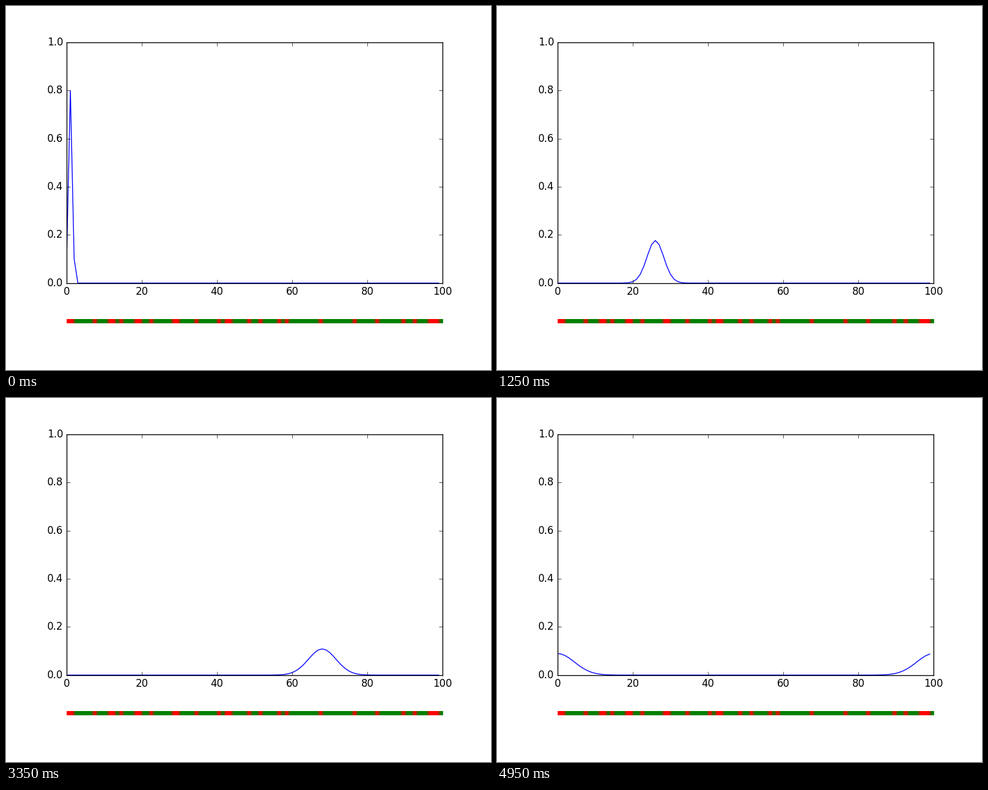
Animation, 800 px wide and 600 px high, one loop 5 s. Source, as a matplotlib script:

```python
import matplotlib.pyplot as plt
import numpy as np
from matplotlib.animation import FuncAnimation

CELLS = 100
STEPS = 100
W, H, DPI = 800, 600, 100
KERNEL = {0: 0.1, 1: 0.8, 2: 0.1}  # chance of moving this many cells per step
RED_CELLS = [0, 1, 7, 11, 12, 14, 18, 19, 22, 28, 29, 34, 40, 42, 43, 48,
             51, 56, 58, 67, 76, 82, 89, 92, 96, 97, 98]

plt.style.use("classic")
plt.rcParams.update({
    "font.family": "DejaVu Sans",
    "figure.facecolor": "white",
    "savefig.facecolor": "white",
})


def pixel_axes(fig, left, bottom, width, height):
    return fig.add_axes([left / W, bottom / H, width / W, height / H])


def move(belief):
    return sum(p * np.roll(belief, shift) for shift, p in KERNEL.items())


def belief_history():
    belief = np.zeros(CELLS)
    belief[0] = 1.0
    history = []
    for _ in range(STEPS):
        belief = move(belief)
        history.append(belief)
    return history


history = belief_history()
fig = plt.figure(figsize=(W / DPI, H / DPI), dpi=DPI)

# Belief plot
ax = pixel_axes(fig, 100, 143.31, 620, 396.69)
ax.set_xlim(0, CELLS)
ax.set_ylim(0, 1)
ax.set_xticks(np.arange(0, 101, 20))
ax.set_yticks(np.linspace(0, 1, 6))
line, = ax.plot(np.arange(CELLS), history[0], color="blue", linewidth=1)

# Coloured world strip, one cell per position
world = np.zeros((1, CELLS, 3), dtype=np.uint8)
world[0, :] = (0, 128, 0)
world[0, RED_CELLS] = (255, 0, 0)
strip = pixel_axes(fig, 100, 77, 621, 7)
strip.imshow(world, interpolation="bilinear", aspect="auto")
strip.axis("off")


def update(step):
    line.set_ydata(history[step])
    return line,


anim = FuncAnimation(fig, update, frames=STEPS, interval=50,
                     repeat=True, repeat_delay=0, blit=False)
plt.show()
```
